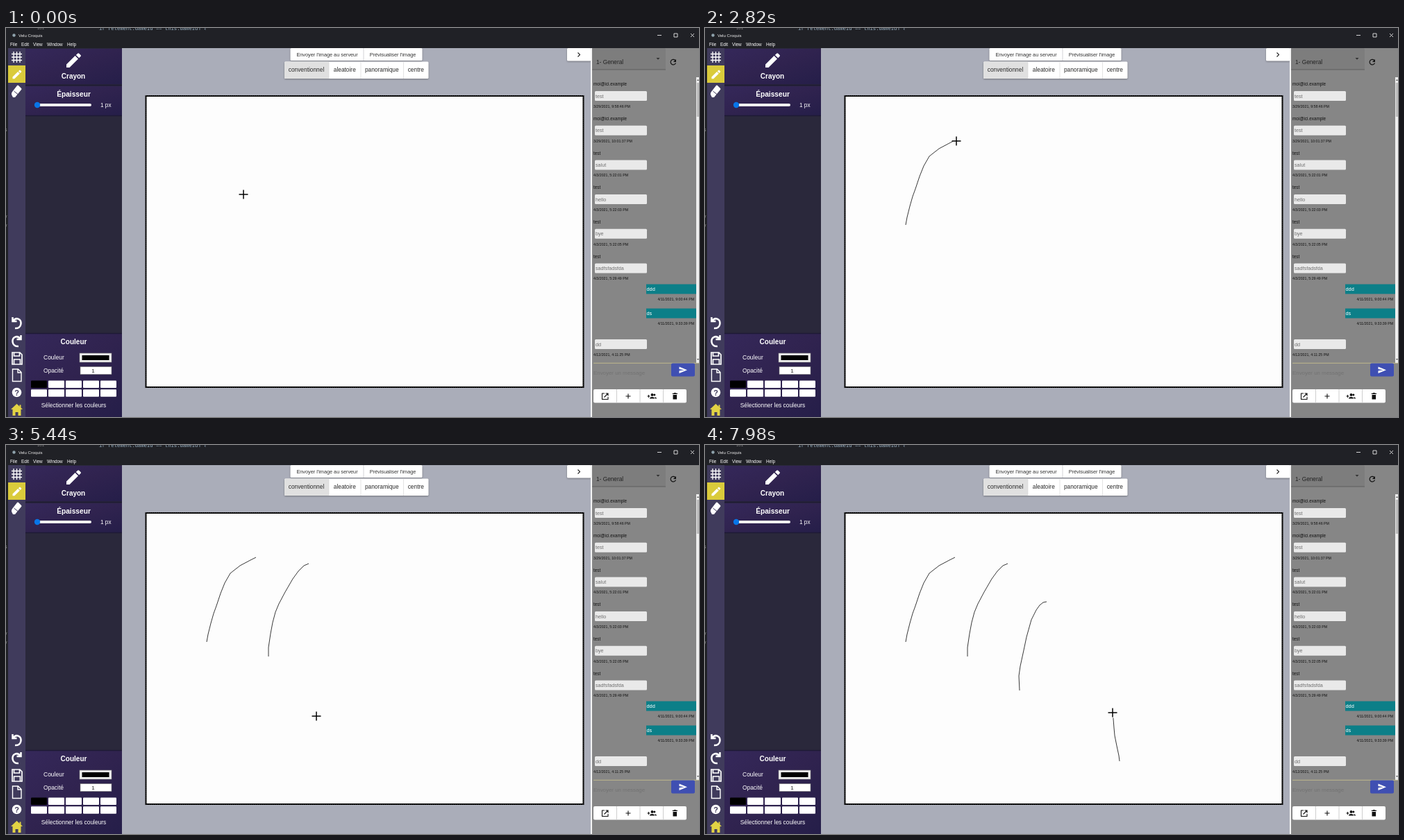
An HTML page for the animation above (8000 ms loop, 998 px wide and 561 px high).

```html
<!DOCTYPE html>
<html lang="fr">
<head>
<meta charset="utf-8">
<title>Velu Croquis</title>
<style>
html, body { margin: 0; width: 100%; height: 100%; overflow: hidden; background: #1e1e1e; }
svg { display: block; width: 998px; height: 561px; font-family: "Liberation Sans", Arial, sans-serif; }
.ink { fill: none; stroke: #222; stroke-width: .9; stroke-linejoin: round; }
</style>
</head>
<body>
<svg id="stage" viewBox="0 0 998 561">
  <defs>
    <linearGradient id="violet" x1="0" y1="0" x2="1" y2="1">
      <stop offset="0" stop-color="#35285a"/><stop offset=".5" stop-color="#30234f"/><stop offset="1" stop-color="#251e49"/>
    </linearGradient>
    <clipPath id="sliver"><rect width="998" height="3"/></clipPath>
    <path id="pencil" d="M0 16.5V21h4.5L17 8.5 12.500 4zM18.200 7.300l2.300-2.300a1.400 1.400 0 0 0 0-2L18.200.7a1.400 1.400 0 0 0-2 0L13.800 3z"/>
    <path id="turn" d="M2.500 1v6h6M3 6.500C8 0 15 4 14.500 10.500C14 15 10.500 17.500 6 17"/>
  </defs>
  <g id="ui"></g>
  <g id="strokes"></g>
  <path id="cursor" d="M-6.500 0H6.500M0-6.500V6.500" stroke="#000" stroke-width="1.500"/>
</svg>
<script>
const ui = document.getElementById('ui');
const parts = [];
const add = markup => parts.push(markup);
const rect = (x, y, w, h, fill, extra = '') =>
  add(`<rect x="${x}" y="${y}" width="${w}" height="${h}" fill="${fill}" ${extra}/>`);
const line = (d, color, width = 1, extra = '') =>
  add(`<path d="${d}" fill="none" stroke="${color}" stroke-width="${width}" ${extra}/>`);
const shape = (d, fill, extra = '') => add(`<path d="${d}" fill="${fill}" ${extra}/>`);
// y is the middle of the line of text
const text = (x, y, str, size, fill, extra = '') =>
  add(`<text x="${x}" y="${y + size * .35}" font-size="${size}" fill="${fill}" ${extra}>${str}</text>`);
const mid = 'text-anchor="middle"', end = 'text-anchor="end"', bold = 'font-weight="700"';

function windowFrame() {
  rect(0, 0, 998, 561, '#202126');
  text(134, 0, 'if (element.gameId == this.gameId) {', 7.2, '#9cb6c8',
    'clip-path="url(#sliver)" font-family="Liberation Mono, monospace"');
  text(45, 0, '101', 6, '#858585', 'clip-path="url(#sliver)"');
  text(-2, 147, 's', 7, '#999');
  text(-2, 272, 'v', 7, '#999');
  text(-2, 285, 'v', 7, '#999');
  rect(3, 3, 995, 26, '#202126');
  add('<circle cx="11.500" cy="10.500" r="2.200" fill="#8fa3ad"/>');
  text(18, 10.5, 'Velu Croquis', 6.1, '#eee');
  [[6, 'File'], [22, 'Edit'], [39, 'View'], [59, 'Window'], [88, 'Help']]
    .forEach(([x, s]) => text(x, 23.5, s, 6.4, '#fff'));
  line('M938 10.500h6M962 8h5v5h-5zM986 8l5 5m0-5l-5 5', '#e8e8e8', .9);
}

function toolStrip() {
  rect(3, 29, 25, 532, '#403b5c');
  line('M8 37.500h15M8 42h15M8 46.500h15M11 34v16M15.500 34v16M20 34v16', '#fff', 1.3);
  rect(3, 54, 25, 25, '#dacb3b');
  add('<use href="#pencil" fill="#fff" transform="translate(9.500 60.500) scale(.61)"/>');
  shape('M9 92l7-9q1-1 2 0l4 4q1 1 0 2l-9 11h-3l-2-4q-.500-2 1-4z', '#fff');
  line('M11.500 91l6 5', '#403b5c', 1);
  add('<use href="#turn" x="7" y="416" fill="none" stroke="#fff" stroke-width="2.500"/>');
  add('<use href="#turn" fill="none" stroke="#fff" stroke-width="2.500" transform="matrix(-1 0 0 1 24 442)"/>');
  line('M9 468h11l3 3v14h-14zM11.500 468v5h8v-5M11.500 485v-7h9v7', '#fff', 1.7);
  line('M9.500 492h8l4.500 4.500v13h-12.500zM17 492v5h5', '#fff', 1.4);
  add('<circle cx="15.500" cy="525.500" r="6.800" fill="#fff"/>');
  text(15.500, 525.700, '?', 11, '#403b5c', mid + bold);
  shape('M15.500 542l8.500 8h-2.500v9h-4v-5h-4v5h-4v-9H7z', '#e2d344');
  shape('M19.500 543.500h2v5h-2z', '#e2d344');
}

function optionsPanel() {
  rect(28, 29, 139, 532, '#2a283b');
  rect(28, 30, 139, 51, 'url(#violet)');
  rect(28, 84, 139, 42, 'url(#violet)');
  rect(28, 441, 139, 120, 'url(#violet)');
  line('M28 82.500h139M28 126.500h139M28 440.500h139', '#1e1a36', 1.5);
  add('<use href="#pencil" x="87" y="36" fill="#fff" transform="translate(0 0)"/>');
  text(97, 69, 'Crayon', 10, '#fff', mid + bold);
  text(97.500, 95, 'Épaisseur', 10.2, '#fff', mid + bold);
  rect(42, 109, 81, 4, '#efefef', 'rx="2"');
  add('<circle cx="45" cy="111" r="4.200" fill="#0875e8"/>');
  text(136, 111, '1 px', 8.2, '#fff');
  text(97.500, 452, 'Couleur', 10, '#fff', mid + bold);
  text(54, 475.500, 'Couleur', 8.5, '#fff');
  text(54, 494, 'Opacité', 8.4, '#fff');
  rect(106, 469, 46, 13, '#efefef', 'stroke="#888" stroke-width=".600"');
  rect(109.500, 472, 39, 7, '#000');
  rect(107, 488.500, 45, 11, '#fff', 'stroke="#777" stroke-width=".600"');
  text(125.500, 494, '1', 8, '#222', mid);
  for (let i = 0; i < 10; i++)
    rect(36 + i % 5 * 25, i < 5 ? 508.5 : 521.3, 23, 10.5, i ? '#fff' : '#000', 'rx="1"');
  text(97.500, 544.500, 'Sélectionner les couleurs', 8.4, '#fff', mid);
}

function workArea() {
  rect(167, 29, 676, 532, '#aaadb9');
  const shadow = 'rx="1.500" style="filter:drop-shadow(0 1px 1px #0005)"';
  rect(409.500, 29, 190, 18, '#fff', shadow);
  line('M515 29v18', '#c8c8cc', .8);
  text(462.500, 38, "Envoyer l'image au serveur", 7.3, '#333', mid);
  text(557, 38, "Prévisualiser l'image", 7.3, '#333', mid);
  rect(401, 48.500, 207.500, 24.500, '#fff', shadow);
  rect(401, 48.500, 64, 24.500, '#e0e0e0', 'rx="1.500"');
  line('M465 48.500v24.500M511 48.500v24.500M572.500 48.500v24.500', '#d8d8d8', .7);
  [[432.500, 'conventionnel'], [487.800, 'aleatoire'], [541.300, 'panoramique'], [590.300, 'centre']]
    .forEach(([x, s]) => text(x, 60.500, s, 8.35, '#2a2a2a', mid));
  rect(808, 29, 34.500, 18.500, '#fff', shadow);
  line('M823.500 35.500l3 3-3 3', '#222', 1.1);
  rect(201.500, 98, 630, 420, '#fdfdfd', 'stroke="#000" stroke-width="2"');
  rect(201, 97.500, 631, 421, 'none', 'stroke="#555" stroke-width=".500" stroke-dasharray="1.500 1.500"');
}

function message(y, label, body, date) {
  if (label) text(846, y - 17, label, 6.3, '#111');
  rect(848, y - 7, 75, 14, '#e9e9e9', 'rx="1.500"');
  text(849, y, body, 7.2, '#707070');
  text(846, y + 15, date, 5.24, '#111');
}

function reply(y, body, date) {
  rect(922, y - 7, 72, 14, '#0c7f88');
  text(922.500, y, body, 7.4, '#fff');
  text(991, y + 14.700, date, 5.24, '#111', end);
}

function chat() {
  rect(842, 29, 2, 532, '#f4f4f4');
  rect(844, 29, 154, 532, '#868686');
  rect(844, 29, 106, 31, '#7d7d7d', 'rx="2"');
  line('M844 60h106', '#555', .8);
  text(850, 49, '1- General', 8.3, '#222');
  shape('M936.500 43h5l-2.500 2.700z', '#333');
  line('M963.700 46.500a3.800 3.800 0 1 0 .800 4', '#111', 1.2);
  shape('M965 45v4h-4z', '#111');
  const mail = 'moi@ici.example';
  [[mail, 'test', '3/29/2021, 9:58:46 PM'], [mail, 'test', '3/29/2021, 10:01:37 PM'],
   ['test', 'salut', '4/3/2021, 5:22:01 PM'], ['test', 'hello', '4/3/2021, 5:22:03 PM'],
   ['test', 'bye', '4/3/2021, 5:22:05 PM'], ['test', 'sadfsfadsfda', '4/3/2021, 5:29:49 PM']]
    .forEach((m, i) => message(98 + 49.7 * i, ...m));
  reply(376.500, 'ddd', '4/11/2021, 9:00:44 PM');
  reply(411.500, 'ds', '4/11/2021, 9:33:39 PM');
  message(456, '', 'dd', '4/12/2021, 4:11:25 PM');
  rect(994, 71, 4, 412, '#eeeeee');
  rect(994.800, 79, 3.200, 49, '#bcbcbc');
  shape('M995 76h3l-1.500-2zM995 477h3l-1.500 2z', '#555');
  line('M846 483.300h152', '#c6bf8c', .9);
  text(846, 497, 'Envoyer un message', 7.9, '#737373');
  rect(958, 483.500, 34, 19, '#3f4fb2', 'rx="2"');
  shape('M969.500 488.500l11.500 4.700-11.500 4.700v-3.600l7.500-1.100-7.500-1.100z', '#fff');
  rect(846, 521, 134, 19.500, '#fff', 'rx="2"');
  line('M879.500 521v19.500M913 521v19.500M946.500 521v19.500', '#c9c9c9', .9);
  line('M862 527h-3.500v8.500h8.500v-3.500M863.500 527h3.500v3.500M867 527l-5.500 5.500', '#111', 1.1);
  line('M896 527.500v7M892.500 531h7', '#111', 1.1);
  line('M923.500 531h4M925.500 529v4', '#111', 1);
  add('<g fill="#111"><circle cx="930.500" cy="529" r="1.900"/><circle cx="933.800" cy="529" r="1.600"/></g>');
  shape('M927 534.500q0-2.500 3.500-2.500t3.500 2.500zM934.700 534.500q0-1.500-.800-2.300q3 .100 3 2.300z', '#111');
  shape('M960.500 529h5.600v6.500h-5.600zM959.800 526.800h2l.600-.700h2l.600.700h2v1.200h-7.200z', '#111');
}

[windowFrame, toolStrip, optionsPanel, workArea, chat].forEach(draw => draw());
ui.innerHTML = parts.join('');

// Cursor legs: start, finish, path, whether the pencil is down
const legs = [
  [150, 1350, 'M342 240Q318 252 289 281', false],
  [1800, 1900, 'M289 281V284', false],
  [1960, 2790, 'M289 284L291 273 295 257 299 243 303 232 309 214 315 199 323 185 337 174 352 166 360 162', true],
  [2790, 2820, 'M360 162L362 163', false],
  [2940, 3700, 'M362 163Q385 220 378 299', false],
  [3780, 3860, 'M378 299V305', false],
  [3900, 4720, 'M378 305V292L381 272 384 256 388 241 393 229 402 212 413 193 421 182 429 174 436 171', true],
  [4820, 5440, 'M436 171Q470 270 447 391', false],
  [5440, 5590, 'M447 391Q452 372 453 354', false],
  [5602, 6382, 'M453 354L452 333 454 319 459 296 463 277 470 252 477 238 482 231 487 227 492 226', true],
  [6520, 7400, 'M492 226Q570 320 597 456', false],
  [7520, 7980, 'M597 456L596 448 593 434 590 419 589 408 588 395 587 386', true]
].map(([start, finish, d, pen]) => {
  const path = document.createElementNS('http://www.w3.org/2000/svg', 'path');
  path.setAttribute('d', d);
  if (pen) {
    path.setAttribute('class', 'ink');
    document.getElementById('strokes').append(path);
  }
  return { start, finish, path, pen, length: path.getTotalLength() };
});

const LOOP = 8000, INK_LAG = 50;
const cursor = document.getElementById('cursor');
const progress = (leg, t) => {
  const p = Math.min(1, Math.max(0, (t - leg.start) / (leg.finish - leg.start)));
  return leg.pen ? p : p * p * (3 - 2 * p);
};

function render(t) {
  const current = legs.filter(leg => leg.start <= t).pop() || legs[0];
  const { x, y } = current.path.getPointAtLength(progress(current, t) * current.length);
  cursor.setAttribute('transform', `translate(${x} ${y})`);
  for (const leg of legs) {
    if (!leg.pen) continue;
    const drawn = progress(leg, t - INK_LAG) * leg.length;
    leg.path.style.visibility = drawn > 0 ? 'visible' : 'hidden';
    leg.path.setAttribute('stroke-dasharray', `${drawn} ${leg.length + 1}`);
  }
}

const origin = performance.now();
function tick() {
  render((performance.now() - origin) % LOOP);
  requestAnimationFrame(tick);
}
render(0);
requestAnimationFrame(tick);
</script>
</body>
</html>
```
